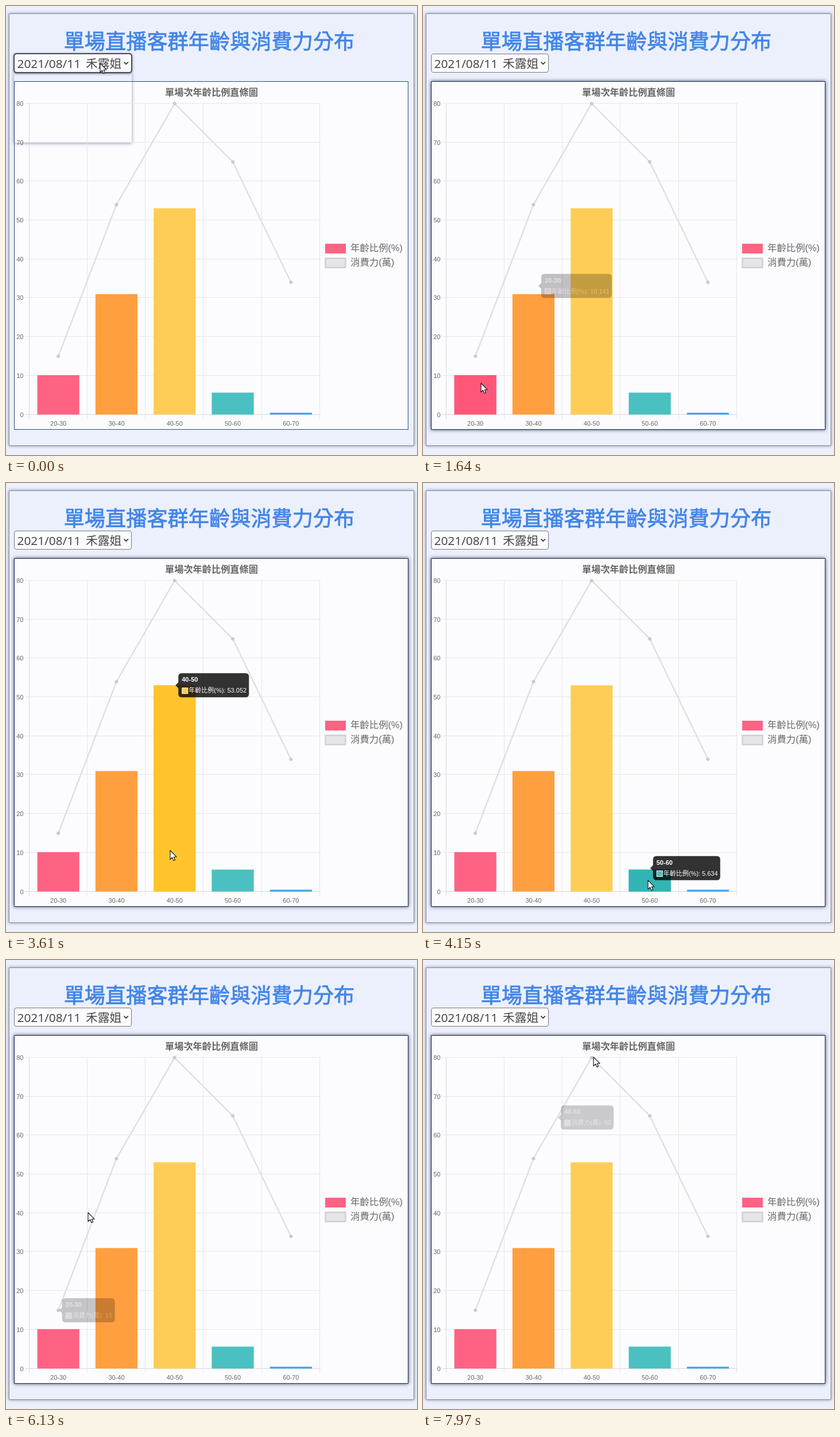
An HTML page for the animation above (8 s loop, 716x782 px).

```html
<!DOCTYPE html>
<html lang="zh-Hant">
<head>
<meta charset="utf-8">
<title>年齡與消費力</title>
<style>
  html, body { margin: 0; width: 100%; height: 100%; overflow: hidden; background: #ecf0fd; }
  div, svg { position: absolute; box-sizing: border-box; }
  #stage { left: 0; top: 0; width: 716px; height: 782px; overflow: hidden; }
  #panel { left: 5px; top: 13px; width: 706px; height: 753px; border: 1px solid #8f92a8; box-shadow: 0 0 5px rgba(30, 30, 50, .55); background: #ecf0fd; }
  #chart, #glow { left: 14px; top: 131px; width: 687px; height: 607px; }
  #chart { border: 1px solid #2c4a74; background: #fcfcfe; }
  #glow { border: 1px solid #1c2f5c; box-shadow: 0 0 6px rgba(20, 24, 45, .8); }
  #select { left: 14px; top: 83px; width: 205px; height: 33px; border: 1px solid #767680; border-radius: 4px; background: #fcfcfe; }
  #focus { left: 13px; top: 82px; width: 207px; height: 35px; border: 2px solid #4c4c58; border-radius: 5px; box-shadow: 0 1px 4px rgba(40, 40, 80, .5); }
  #popup { left: 14px; top: 118px; width: 205px; height: 120px; box-shadow: 0 1px 6px rgba(60, 60, 130, .55); }
  svg { left: 0; top: 0; }
  text { font-family: "Liberation Sans", "Noto Sans CJK TC", "Noto Sans CJK", sans-serif; fill: #666; font-size: 11px; }
  .cjk { font-family: "Noto Sans CJK TC", "Noto Sans CJK", sans-serif; }
  .heading { font-size: 36.2px; fill: #4285e8; stroke: #4285e8; stroke-width: .8; }
  .picker { font: 300 20.8px "Noto Sans", "Noto Sans CJK TC", "Noto Sans CJK", sans-serif; fill: #484848; }
</style>
</head>
<body>
<div id="stage">
  <div id="panel"></div>
  <div id="chart"></div>
  <div id="glow"></div>
  <div id="select"></div>
  <div id="focus"></div>
  <div id="popup"></div>
  <svg id="art" width="716" height="782">
    <text class="cjk heading" x="354" y="74.5" text-anchor="middle">單場直播客群年齡與消費力分布</text>
    <text class="picker" x="19.5" y="107.5">2021/08/11</text>
    <text class="picker" x="139" y="107.5">禾露姐</text>
    <path d="M205.5 97.5l3.7 3.7 3.7-3.7" fill="none" stroke="#333" stroke-width="1.7"/>
    <text class="cjk" x="358" y="156" text-anchor="middle" style="font-size:16.2px;font-weight:700">單場次年齡比例直條圖</text>
    <g id="plot"></g>
    <rect x="556" y="414" width="36" height="17" fill="#ff6384"/>
    <text x="600" y="427" style="font-size:16.4px">年齡比例(%)</text>
    <rect x="556.5" y="439.5" width="35" height="16" fill="#e6e6e8" stroke="#cfcfd8" stroke-width="2.5"/>
    <text x="600" y="452" style="font-size:16.4px">消費力(萬)</text>
    <g id="tip">
      <path id="tipBox" fill="rgba(0,0,0,.8)"/>
      <g id="tipText">
        <text id="tipTitle" x="6" y="15" style="fill:#fff;font-weight:700"></text>
        <rect id="tipSwatch" x="6.5" y="25.5" width="10" height="10" stroke="#fff"/>
        <text id="tipBody" x="18" y="34" style="fill:#fff"></text>
      </g>
    </g>
    <path id="cursor" d="M0 0V15.5L3.6 12.2 6 17.6 8.6 16.5 6.2 11.2H11Z" fill="#fff" stroke="#111" stroke-width="1.1" stroke-linejoin="round"/>
  </svg>
</div>
<script>
const LOOP = 8000;
const $ = id => document.getElementById(id);
const clamp = v => Math.max(0, Math.min(1, v));
const mix = (a, b, k) => a + (b - a) * k;
const outQuart = k => 1 - (1 - clamp(k)) ** 4;

const ages = ['20-30', '30-40', '40-50', '50-60', '60-70'];
const share = [10.141, 30.986, 53.052, 5.634, 0.451];
const spend = [15, 54, 80, 65, 34];
const colors = ['#ff6384', '#ff9f40', '#ffcd56', '#4bc0c0', '#36a2eb'];
const hoverColors = ['#ff4a6e', '#ff9124', '#ffc42c', '#33b4b4', '#1c94e8'];
const colX = i => 91.15 + 101.3 * i;
const valY = v => 711.5 - 6.77 * v;

function add(tag, attrs, text) {
  const el = document.createElementNS('http://www.w3.org/2000/svg', tag);
  for (const key in attrs) el.setAttribute(key, attrs[key]);
  if (text !== undefined) el.textContent = text;
  return $('plot').appendChild(el);
}

for (let v = 0; v <= 80; v += 10) {
  const y = Math.round(valY(v)) - .5;
  add('path', { d: `M34 ${y}H548`, stroke: v ? '#e7e7ea' : '#d6d6dc' });
  add('text', { x: 30.5, y: y + 4, 'text-anchor': 'end' }, v);
}
for (let i = 0; i <= 5; i++) {
  const x = Math.round(40.5 + 101.3 * i) - .5;
  add('path', { d: `M${x} 170V719`, stroke: i ? '#e7e7ea' : '#d6d6dc' });
}
const hoverBars = ages.map((age, i) => {
  const top = valY(share[i]);
  const box = { x: colX(i) - 36.6, y: top, width: 73.2, height: 711.5 - top };
  add('text', { x: colX(i), y: 731, 'text-anchor': 'middle' }, age);
  add('rect', { ...box, fill: colors[i] });
  return add('rect', { ...box, fill: hoverColors[i] });
});
add('polyline', {
  points: spend.map((v, i) => [colX(i), valY(v)]).join(' '),
  fill: 'none', stroke: '#dfdfe3', 'stroke-width': 2.4, 'stroke-linejoin': 'round'
});
spend.forEach((v, i) => add('circle', { cx: colX(i), cy: valY(v), r: 3, fill: '#c9cbcf' }));

// Hovered items: start, end, column, and whether it is a bar or a line point.
const bar = (from, to, i, at) => ({
  from, to, i, bar: true, x: colX(i), y: valY(share[i]), width: i > 2 ? 117 : 123,
  body: `年齡比例(%): ${share[i]}`, color: colors[i], ...at
});
const point = (from, to, i) => ({
  from, to, i, x: colX(i), y: valY(spend[i]), width: 92,
  body: `消費力(萬): ${spend[i]}`, color: '#c9cbcf'
});
const hovers = [
  bar(1583, 2250, 0), bar(2610, 3120, 1), bar(3200, 3800, 2), bar(3870, 4390, 3),
  bar(4400, 4560, 2, { x: 291.3, y: 372.5 }),
  point(5560, 5984, 0), point(6480, 7250, 1), point(7922, 9000, 2)
];

// Cursor stops: time, x, y.
const stops = [
  [0, 164, 100], [300, 164, 100], [900, 158, 240], [1560, 101, 657], [2100, 101, 657],
  [2300, 138, 664], [2500, 142, 662], [2600, 205, 646], [3050, 212, 646], [3250, 286, 640],
  [3720, 286, 640], [3900, 392, 692], [4300, 392, 692], [4580, 7, 580], [4740, 7, 580],
  [5100, 3, 588], [5560, 91, 610], [5950, 92, 609], [6130, 143, 440], [6470, 192, 346],
  [7200, 193, 346], [7560, 240, 270], [7920, 297, 169], [8000, 297, 169]
];

function cursorAt(t) {
  const n = stops.findIndex(s => s[0] > t);
  const [t0, x0, y0] = stops[n - 1], [t1, x1, y1] = stops[n];
  const k = (t - t0) / (t1 - t0), e = k * k * (3 - 2 * k);
  return [mix(x0, x1, e), mix(y0, y1, e)];
}

// The tooltip glides from wherever the previous hover left it.
function tipAt(t) {
  let state = { x: colX(2), y: valY(share[2]), width: 123, alpha: 0, item: hovers[0] };
  hovers.forEach((h, n) => {
    if (t < h.from) return;
    const end = Math.min(t, hovers[n + 1] ? hovers[n + 1].from : LOOP);
    const k = outQuart((end - h.from) / 400);
    const shown = clamp(state.alpha + (Math.min(end, h.to) - h.from) / 200);
    state = {
      x: mix(state.x, h.x, k), y: mix(state.y, h.y, k), width: mix(state.width, h.width, k),
      alpha: clamp(shown - Math.max(0, end - h.to) / 200), item: h
    };
  });
  return state;
}

function barGlow(t, i) {
  return Math.max(0, ...hovers.filter(h => h.bar && h.i === i && t >= h.from).map(h =>
    t < h.to ? outQuart((t - h.from) / 400) : 1 - outQuart((t - h.to) / 400)));
}

function render(t) {
  const [cx, cy] = cursorAt(t);
  $('cursor').setAttribute('transform', `translate(${cx} ${cy})`);

  const tip = tipAt(t), w = tip.width;
  $('tip').setAttribute('transform', `translate(${tip.x + 6.5} ${tip.y - 21})`);
  $('tip').setAttribute('opacity', tip.alpha);
  $('tipText').setAttribute('opacity', Math.sqrt(tip.alpha));
  $('tipBox').setAttribute('d', `M6 0H${w - 6}q6 0 6 6V36q0 6-6 6H6q-6 0-6-6V26L-5 21 0 16V6q0-6 6-6Z`);
  $('tipTitle').textContent = ages[tip.item.i];
  $('tipBody').textContent = tip.item.body;
  $('tipSwatch').setAttribute('fill', tip.item.color);

  hoverBars.forEach((el, i) => el.setAttribute('opacity', barGlow(t, i)));

  const fade = (start, length) => clamp((t - start) / length);
  $('glow').style.opacity = fade(560, 300) - fade(4480, 250) + fade(5220, 250);
  $('popup').style.opacity = 1 - fade(130, 120);
  $('focus').style.opacity = t < 500 ? 1 : 0;
}

const began = performance.now();
function tick() {
  render((performance.now() - began) % LOOP);
  requestAnimationFrame(tick);
}
tick();
</script>
</body>
</html>
```
